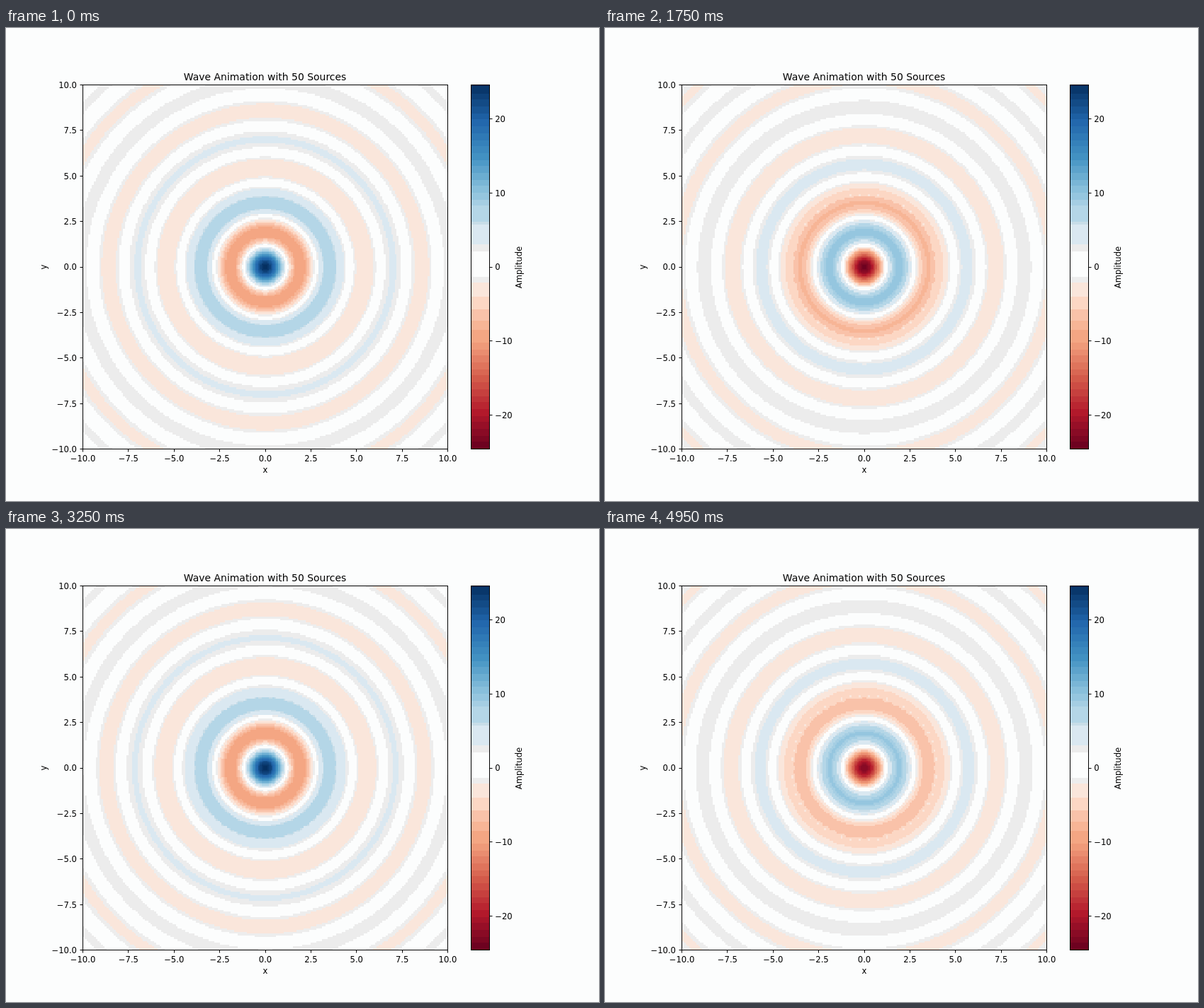
Recreate the animation shown at these times as an HTML page with a canvas. Size 837 by 669 pixels, loop 5000 ms.

```html
<!DOCTYPE html>
<html lang="en">
<head>
<meta charset="utf-8">
<title>Wave Animation</title>
<style>
  html, body { margin: 0; width: 100%; height: 100%; overflow: hidden; background: #fcfdfd; }
  canvas, svg { position: absolute; left: 0; top: 0; }
  svg { font: 11.62px "DejaVu Sans", sans-serif; }
</style>
</head>
<body>
<canvas id="stage" width="837" height="669"></canvas>
<svg id="axes" width="837" height="669" viewBox="0 0 837 669"></svg>
<script>
const N = 200, SOURCES = 50, RING = 4, K = 2;
const FRAMES = 100, STEP = 50, T_END = 10;
const BOX = { x: 108.5, y: 80.5, size: 515 };
const BAR = { x: 656.5, w: 26 };
const MID = BOX.y + BOX.size / 2;

// Standing parts of the field: value(t) = S cos t - C sin t
const S = new Float32Array(N * N), C = new Float32Array(N * N);
const grid = i => -10 + 20 * i / (N - 1);
for (let s = 0; s < SOURCES; s++) {
  const a = 2 * Math.PI * s / SOURCES;
  const sx = RING * Math.cos(a), sy = RING * Math.sin(a);
  for (let j = 0, p = 0; j < N; j++) {
    for (let i = 0; i < N; i++, p++) {
      const r = Math.hypot(grid(i) - sx, grid(j) - sy);
      const amp = 1 / Math.sqrt(r);
      S[p] += amp * Math.sin(K * r);
      C[p] += amp * Math.cos(K * r);
    }
  }
}
const MAX = S.reduce((m, v) => Math.max(m, Math.abs(v)), 0);

// Red to blue colour scale, reduced to flat bands
const hex = h => [1, 3, 5].map(k => parseInt(h.slice(k, k + 2), 16));
const RDBU = ["#67001f", "#b2182b", "#d6604d", "#f4a582", "#fddbc7", "#f7f7f7",
  "#d1e5f0", "#92c5de", "#4393c3", "#2166ac", "#053061"].map(hex);
const BANDS = [
  [-8.4, "#f4a683"], [-7.4, "#f7b596"], [-5.8, "#f9c2a9"], [-4.1, "#fcd7c4"],
  [-2.2, "#fae6db"], [-1.3, "#ededed"], [2.1, "#fcfdfd"], [3, "#ececec"],
  [5.7, "#dae8f1"], [6.2, "#c8dde8"], [8.2, "#b4d6e7"], [9.1, "#a5cee3"], [10, "#95c6df"]
].map(([top, h]) => [top, hex(h)]);

function rdbu(v) {
  const f = Math.min(9.999, Math.max(0, (v / MAX + 1) * 5));
  const k = Math.floor(f);
  return RDBU[k].map((c, n) => Math.round(c + (RDBU[k + 1][n] - c) * (f - k)));
}

function bandColor(v) {
  if (v > -10.2 && v < 10) return BANDS.find(b => v < b[0])[1];
  const w = 0.9, edge = v < 0 ? -10.2 : 10;
  return rdbu(edge + (Math.floor((v - edge) / w) + 0.5) * w);
}

const LUT = Array.from({ length: 256 }, (_, i) => bandColor(((i + 0.5) / 128 - 1) * MAX));
const PACKED = Uint32Array.from(LUT, ([r, g, b]) => (255 << 24 | b << 16 | g << 8 | r) >>> 0);

// Axes, colour bar and labels
const line = (x1, y1, x2, y2) => `<path d="M${x1} ${y1}L${x2} ${y2}" stroke="#000"/>`;
const text = (x, y, str, anchor = "middle", extra = "") =>
  `<text x="${x}" y="${y}" text-anchor="${anchor}" ${extra}>${str}</text>`;
const upright = (x, y, str) => text(0, 0, str, "middle", `transform="translate(${x} ${y}) rotate(-90)"`);
const frame = (x, w) =>
  `<rect x="${x}" y="${BOX.y}" width="${w}" height="${BOX.size}" fill="none" stroke="#000"/>`;
const num = (v, d) => v.toFixed(d).replace("-", "\u2212");
const crisp = v => Math.floor(v) + 0.5;

let art = "";
const rowH = BOX.size / 256;
LUT.forEach((c, i) => {
  const y0 = Math.round(BOX.y + BOX.size - (i + 1) * rowH);
  const y1 = Math.round(BOX.y + BOX.size - i * rowH);
  art += `<rect x="${BAR.x}" y="${y0}" width="${BAR.w}" height="${y1 - y0}" fill="rgb(${c})"/>`;
});
art += frame(BOX.x, BOX.size) + frame(BAR.x, BAR.w);

const bottom = BOX.y + BOX.size;
for (let i = 0; i <= 8; i++) {
  const v = -10 + 2.5 * i, d = BOX.size * i / 8;
  const x = BOX.x + d, y = bottom - d;
  art += line(crisp(x), bottom, crisp(x), bottom + 4) + text(x, 613, num(v, 1));
  art += line(BOX.x - 4, crisp(y), BOX.x, crisp(y)) + text(100, y + 4.4, num(v, 1), "end");
}
for (let v = -20; v <= 20; v += 10) {
  const y = MID - v / MAX * BOX.size / 2, x = BAR.x + BAR.w;
  art += line(x, crisp(y), x + 4, crisp(y)) + text(x + 7.7, y + 4.4, num(v, 0), "start");
}
art += text(365.6, 73.6, "Wave Animation with 50 Sources", "middle", 'font-size="13.95"');
art += text(366, 629, "x") + upright(57, MID, "y") + upright(728, MID + 0.5, "Amplitude");
document.getElementById("axes").innerHTML = art;

// Animated field
const ctx = document.getElementById("stage").getContext("2d");
const cells = document.createElement("canvas");
cells.width = cells.height = N;
const cellCtx = cells.getContext("2d");
const image = cellCtx.createImageData(N, N);
const pixels = new Uint32Array(image.data.buffer);
ctx.imageSmoothingEnabled = false;

function draw(n) {
  const t = T_END * n / (FRAMES - 1);
  const c = Math.cos(t), s = Math.sin(t);
  for (let p = 0; p < pixels.length; p++) {
    const v = S[p] * c - C[p] * s;
    pixels[p] = PACKED[Math.min(255, Math.max(0, Math.floor((v / MAX + 1) * 128)))];
  }
  cellCtx.putImageData(image, 0, 0);
  ctx.drawImage(cells, BOX.x, BOX.y, BOX.size, BOX.size);
}

let shown = 0, start = null;
draw(0);
function tick(now) {
  if (start === null) start = now;
  const n = Math.floor((now - start) / STEP) % FRAMES;
  if (n !== shown) draw(shown = n);
  requestAnimationFrame(tick);
}
requestAnimationFrame(tick);
</script>
</body>
</html>
```
